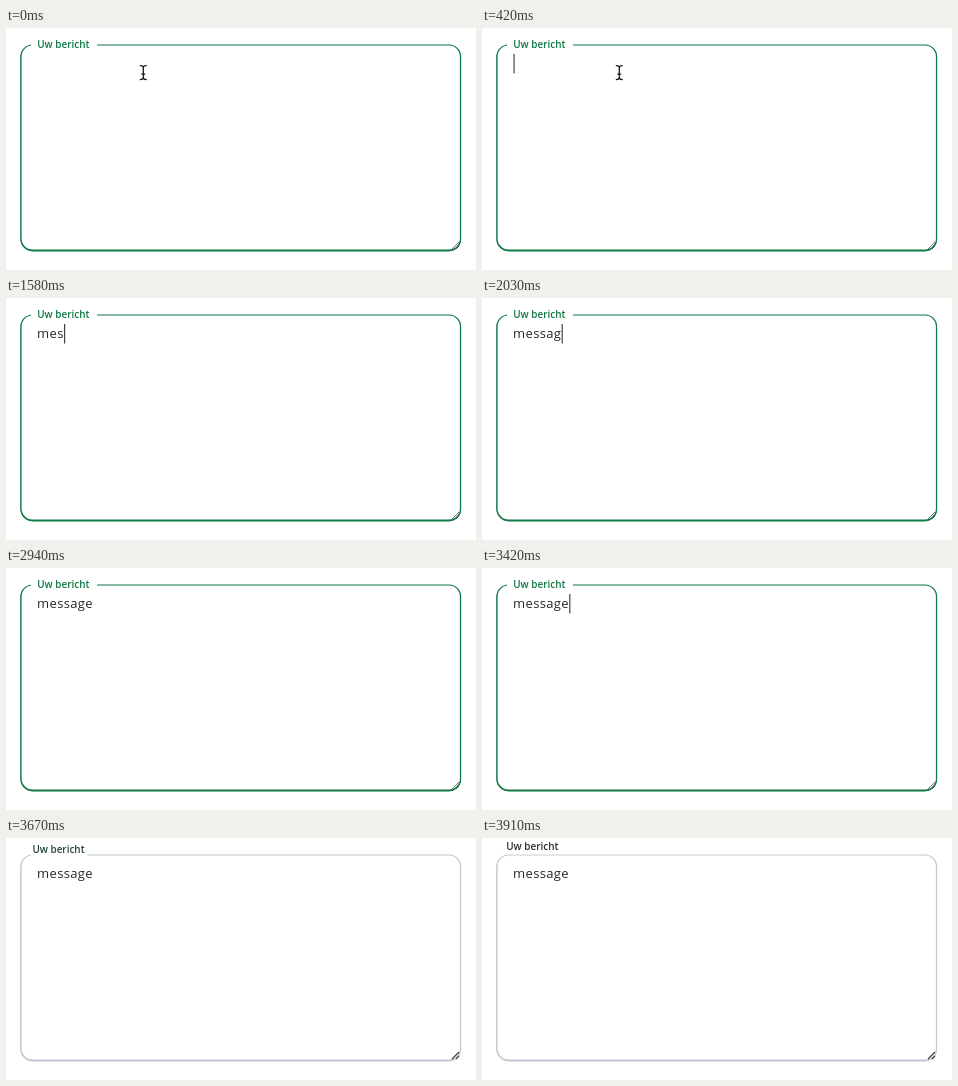
These frames come from a looping animation (470 by 242 pixels, 4560 ms). An HTML page:

```html
<!DOCTYPE html>
<html lang="nl">
<head>
<meta charset="utf-8">
<title>Uw bericht</title>
<style>
  html, body { margin: 0; width: 100%; height: 100%; overflow: hidden; background: #fff; }
  svg { display: block; width: 470px; height: 242px; }
  text { font-family: "Open Sans", "Noto Sans", sans-serif; white-space: pre; }
  #label text { font-size: 9.95px; font-weight: 600; }
  #message { font-size: 13px; letter-spacing: .33px; fill: #25272b; }
  .pointer { fill: none; stroke: #111; stroke-width: 1.25; stroke-linecap: round; }
</style>
</head>
<body>
<svg viewBox="0 0 470 242">
  <rect id="shadow" x="15" y="17.9" width="439.5" height="204.9" rx="11.5" stroke-width="1.2"/>
  <rect id="field" x="15" y="17" width="439.5" height="205" rx="11.5" fill="#fff" stroke-width="1.2"/>
  <path id="grip" d="M446 221 L453 214 M450 221 L453 218" fill="none" stroke="#3d3d40"/>
  <g id="label">
    <rect x="25" y="-7.5" height="15" fill="#fff"/>
    <text y="3.4">Uw bericht</text>
  </g>
  <text id="message" x="31.1" y="40"></text>
  <rect id="caret" y="26" width="1.1" height="19.5" fill="#333"/>
  <g id="beam" class="pointer">
    <path d="M-3 -7 Q0 -7 0 -5 Q0 -7 3 -7 M0 -5 V5 M-3 7 Q0 7 0 5 Q0 7 3 7 M-1.5 1.5 H1.5"/>
  </g>
  <path id="arrow" d="M0 0 V12 L3 9.3 L5 13.5 L7 12.6 L5 8.5 H8.7 Z" fill="#111" stroke="#fff" stroke-width=".8"/>
</svg>
<script>
const LOOP = 4560, BLUR = 3580, MOVE = 3090, MOVE_STEP = 47;
const WORD = "message";
const KEYS = [1240, 1360, 1580, 1880, 1950, 2030, 2390];
const CARET_ON = [[420, 940], [1240, 2940], [3420, BLUR]];
const GREEN = [15, 119, 67], GREY = [199, 200, 211], DARK = [43, 45, 50];
const PALE = [190, 191, 205];

const el = id => document.getElementById(id);
const labelBox = document.querySelector("#label rect");
const labelText = document.querySelector("#label text");
const set = (node, attrs) => {
  for (const name in attrs) node.setAttribute(name, attrs[name]);
};
const show = (node, on) => { node.style.display = on ? "" : "none"; };
const mix = (a, b, p) => a + (b - a) * p;
const blend = (a, b, p) => `rgb(${a.map((v, i) => Math.round(mix(v, b[i], p)))})`;
const clamp = v => Math.min(1, Math.max(0, v));

// CSS "ease": cubic-bezier(.25, .1, .25, 1), solved by bisection
function ease(x) {
  if (x <= 0 || x >= 1) return clamp(x);
  const curve = (a, b, s) => 3 * a * s * (1 - s) ** 2 + 3 * b * s * s * (1 - s) + s ** 3;
  let low = 0, high = 1;
  for (let i = 0; i < 20; i++) {
    const mid = (low + high) / 2;
    if (curve(.25, .25, mid) < x) low = mid; else high = mid;
  }
  return curve(.1, 1, low);
}

function drawField(t) {
  const since = t < BLUR ? 0 : t - BLUR + 30;
  const line = ease(clamp(since / 140));
  const lift = ease(clamp(since / 300));
  const stroke = blend(GREEN, GREY, line);
  const under = blend(GREEN, PALE, line);
  set(el("field"), { stroke });
  set(el("shadow"), { stroke: under, fill: under });
  set(el("grip"), { "stroke-width": mix(.7, 1.1, line) });

  const pad = mix(7, 0, lift);
  set(el("label"), { transform: `translate(0 ${mix(16.8, 8.6, lift)})` });
  set(labelBox, { width: 52 + 2 * pad });
  set(labelText, { x: 24.2 + pad, fill: blend(GREEN, DARK, lift) });
}

function drawTyping(t) {
  const message = el("message");
  message.textContent = WORD.slice(0, KEYS.filter(k => t >= k).length);
  const end = message.textContent ? message.getComputedTextLength() : 0;
  set(el("caret"), { x: 31.5 + end });
  show(el("caret"), CARET_ON.some(([from, to]) => t >= from && t < to));
}

function drawPointer(t) {
  const step = Math.floor((t - MOVE) / MOVE_STEP);
  const leaving = step >= 0 && step < 7;
  const p = leaving ? (step + 1) / 7 : 0;
  const x = mix(137.3, 305, p), y = mix(44.5, 233, p);
  const place = { transform: `translate(${x} ${y})` };
  set(el("beam"), place);
  set(el("arrow"), place);
  show(el("beam"), t < 1210 || (leaving && y < 222));
  show(el("arrow"), leaving && y >= 222);
}

const start = performance.now();
function frame() {
  const t = (performance.now() - start) % LOOP;
  drawField(t);
  drawTyping(t);
  drawPointer(t);
  requestAnimationFrame(frame);
}
frame();
</script>
</body>
</html>
```
